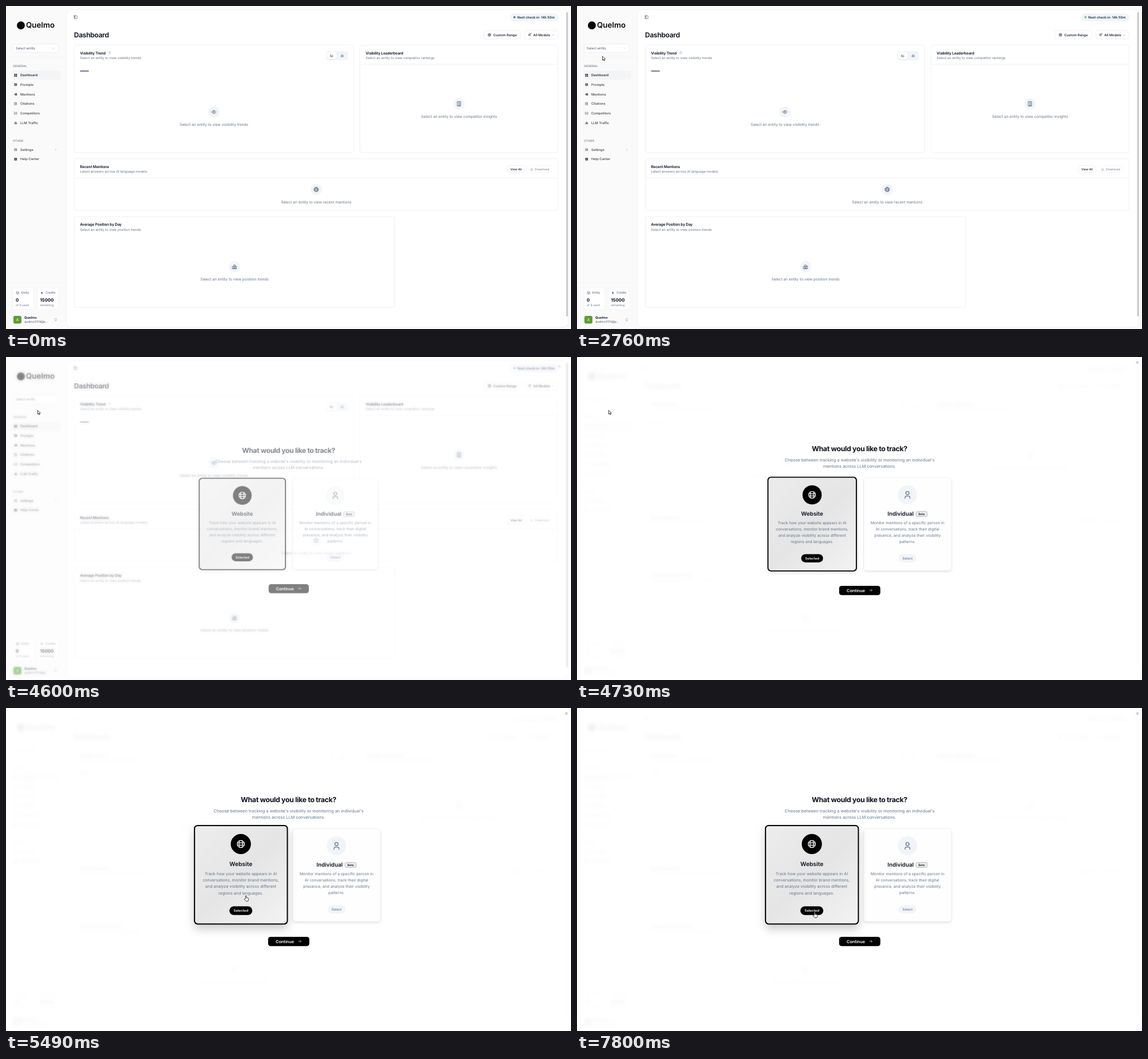
Recreate the animation shown at these times as an HTML page with a canvas. Size 989 px wide and 566 px high, loop 8000 ms.

```html
<!DOCTYPE html>
<html lang="en">
<head>
<meta charset="utf-8">
<title>Dashboard</title>
<style>
html, body { margin: 0; width: 100%; height: 100%; overflow: hidden; background: #fafafa; }
canvas { display: block; width: 989px; height: 566px; }
</style>
</head>
<body>
<canvas id="stage"></canvas>
<script>
const W = 989, H = 566, LOOP = 8000;
const DPR = window.devicePixelRatio || 1;
const INK = '#0a0f1c', SLATE = '#64748b', DARK = '#475569', LINE = '#e6eaef', SOFT = '#f1f5f9';

const ICON = {
  panel: 'M5 3H19Q21 3 21 5V19Q21 21 19 21H5Q3 21 3 19V5Q3 3 5 3ZM9 3V21M6 8V8.1M6 12V12.1',
  down: 'M5 9L12 16L19 9',
  right: 'M9 5L16 12L9 19',
  updown: 'M6 9L12 3L18 9M6 15L12 21L18 15',
  calendar: 'M4 5H20V21H4ZM4 10H20M8 2V6M16 2V6M8 14H9M12 14H13M16 14H17M8 18H9M12 18H13',
  sparkle: 'M10 4L12 10L18 12L12 14L10 20L8 14L2 12L8 10ZM20 2V7M17.5 4.5H22.5M19 18V21',
  info: 'M12 2A10 10 0 1 0 12 22A10 10 0 1 0 12 2ZM12 11V17M12 7V7.5',
  line: 'M3 4V20H21M7 15L11 10L14 13L20 7',
  bars: 'M3 11H9V21H3ZM9 4H15V21H9ZM15 9H21V21H15Z',
  eye: 'M2 12Q6 5 12 5T22 12Q18 19 12 19T2 12ZM12 9A3 3 0 1 0 12 15A3 3 0 1 0 12 9Z',
  building: 'M5 2H19V22H5ZM9 6H9.5M12 6H12.5M15 6H15.5M9 10H9.5M12 10H12.5M15 10H15.5M9 14H9.5M12 14H12.5M15 14H15.5M9 22V18H15V22',
  globe: 'M12 2A10 10 0 1 0 12 22A10 10 0 1 0 12 2ZM12 2A5 10 0 1 0 12 22A5 10 0 1 0 12 2ZM2.5 9H21.5M2.5 15H21.5',
  user: 'M12 2.5A4.6 4.6 0 1 0 12 11.7A4.6 4.6 0 1 0 12 2.5ZM5 22V20Q5 15.5 9.5 15.5H14.5Q19 15.5 19 20V22',
  download: 'M12 3V15M7 10L12 15L17 10M3 16V21H21V16',
  cube: 'M12 2L21 7V17L12 22L3 17V7ZM3 7L12 12L21 7M12 12V22',
  arrow: 'M4 12H20M13 5L20 12L13 19',
  cross: 'M4 4L20 20M20 4L4 20',
  bracket: 'M7 3H3V21H7M17 3H21V21H17M12 8V16M9 12H9.2M15 12H15.2',
  find: 'M20 9V3H3V21H10M7 8H12M15 11A4 4 0 1 0 15 19A4 4 0 1 0 15 11ZM18 18L22 22',
  sliders: 'M5 3V21M12 3V21M19 3V21M2 15H8M9 8H15M16 16H22',
  grid: 'M2 2H10.5V10.5H2ZM13.5 2H22V10.5H13.5ZM2 13.5H10.5V22H2ZM13.5 13.5H22V22H13.5Z',
  chat: 'M5 2H19Q22 2 22 5V16Q22 19 19 19H11L6 23V19H5Q2 19 2 16V5Q2 2 5 2ZM6 7V9H18V7ZM6 12V14H14V12Z',
  voice: 'M2 9H6V16H2ZM7 6H11V19H7ZM12 3H20V21H12ZM21 8H23V16H21Z',
  traffic: 'M2 14H7V21H2ZM9 9H14V21H9ZM16 12H22V21H16ZM3 10L11 3L20 7V9L11 6L4 12Z',
  help: 'M6 2H18Q22 2 22 6V18Q22 22 18 22H6Q2 22 2 18V6Q2 2 6 2ZM11 6V8H13V6ZM11 10V18H13V10Z',
  bolt: 'M14 1L4 14H11L9 23L20 9H13Z'
};
const ARROW = new Path2D('M.5 .5V7.3L2.1 5.9L3.2 8.4L4.4 7.9L3.3 5.5H5.4Z');
const HAND = new Path2D('M2.9 6.3V1.5A.8.8 0 0 1 4.5 1.5V4.4L7 4.9Q8.5 5.2 8.3 6.6L7.9 8.9Q7.7 10 7.1 10.5H3.8L1 7.5C.5 6.7 1.5 6 2.1 6.5Z');

// [time, x, y] of the pointer's centre
const PATH = [
  [760, 985, 594], [1590, 14, 108], [1730, 5, 99.5], [2070, 38, 97], [2340, 38, 97], [2700, 47, 92],
  [3090, 43, 90], [3520, 62.5, 79], [3800, 62.5, 78.5], [4300, 57.5, 97], [4980, 57.5, 97],
  [5420, 421, 333], [5500, 421, 333.5], [5770, 396, 285], [6050, 378, 246], [6540, 424, 361.5],
  [6750, 423.5, 361.5], [6930, 423.5, 361.5], [7150, 426, 370], [7350, 406, 364],
  [7550, 418, 349], [7740, 417, 362.5], [8000, 417, 362.5]
];

let g;

const clamp = v => Math.max(0, Math.min(1, v));
const ramp = (t, a, b) => clamp((t - a) / (b - a));
const easeOut = p => 1 - (1 - p) ** 3;
const mix = (a, b, p) => a + (b - a) * p;

function context(cv) {
  cv.width = W * DPR;
  cv.height = H * DPR;
  const c = cv.getContext('2d');
  c.scale(DPR, DPR);
  return c;
}

function text(s, x, y, size, { w = 400, c = INK, align = 'left', track = 0 } = {}) {
  const k = 8;
  g.save();
  g.translate(x, y + size * .36);
  g.scale(1 / k, 1 / k);
  g.font = `${w} ${size * k}px Inter, sans-serif`;
  g.letterSpacing = `${track * size * k}px`;
  g.textRendering = 'geometricPrecision';
  g.textAlign = align;
  g.fillStyle = c;
  g.fillText(s, 0, 0);
  g.restore();
}

function box(x, y, x2, y2, r, fill, line, lw = .7) {
  g.beginPath();
  g.roundRect(x, y, x2 - x, y2 - y, r);
  if (fill) { g.fillStyle = fill; g.fill(); }
  if (line) { g.strokeStyle = line; g.lineWidth = lw; g.stroke(); }
}

function shadowed(color, blur, dy, draw) {
  g.save();
  g.shadowColor = color;
  g.shadowBlur = blur * DPR;
  g.shadowOffsetY = dy * DPR;
  draw();
  g.restore();
}

function disc(x, y, r, fill) {
  g.beginPath();
  g.arc(x, y, r, 0, 7);
  g.fillStyle = fill;
  g.fill();
}

function icon(name, x, y, size, color, lw = 2, solid = false) {
  const p = new Path2D(ICON[name]);
  g.save();
  g.translate(x - size / 2, y - size / 2);
  g.scale(size / 24, size / 24);
  g.lineCap = g.lineJoin = 'round';
  g.lineWidth = lw;
  g.fillStyle = g.strokeStyle = color;
  if (solid) g.fill(p, 'evenodd'); else g.stroke(p);
  g.restore();
}

function rule(x, x2, y, color = LINE) {
  g.fillStyle = color;
  g.fillRect(x, y - .35, x2 - x, .7);
}

function sidebar() {
  disc(26, 34, 7, '#0a0a0a');
  text('Quelmo', 35, 33.6, 13.4, { w: 600, c: '#0a0a0a' });
  box(12, 66.5, 91.5, 81.5, 4, '#fff', '#e5e7eb');
  text('Select entity', 17, 74, 5.8, { c: DARK });
  icon('down', 83, 74, 5, '#94a3b8');
  rule(0, 106, 89, '#f3f3f4');

  text('GENERAL', 12, 105, 5, { w: 500, c: '#71717a', track: .05 });
  text('OTHER', 12, 235.7, 5, { w: 500, c: '#71717a', track: .05 });
  box(11.5, 113.5, 95.5, 129, 3, '#f3f4f6');
  const rows = [
    ['Dashboard', 'grid', 121.3, true], ['Prompts', 'chat', 138, true], ['Mentions', 'voice', 154.7, true],
    ['Citations', 'find', 171.3], ['Competitors', 'bracket', 188], ['LLM Traffic', 'traffic', 204.7, true],
    ['Settings', 'sliders', 251.7], ['Help Center', 'help', 268.3, true]
  ];
  for (const [label, name, y, solid] of rows) {
    icon(name, 16.8, y, 5.8, y < 125 ? '#18181b' : '#52525b', 2.4, solid);
    text(label, 25, y, 5.82, { w: 500, c: y < 125 ? '#18181b' : '#3f3f46' });
  }
  icon('right', 87, 251.7, 5, SLATE);

  rule(0, 106, 485, '#f3f3f4');
  const stats = [[12, 'Entity', 'cube', '0', 'of 9 used'], [54.5, 'Credits', 'bolt', '15000', 'remaining']];
  for (const [x, label, name, value, note] of stats) {
    box(x, 494, x + 37, 532.5, 4, '#fff', '#eeeff1');
    icon(name, x + 8.3, 502.7, 6, DARK, 2, name === 'bolt');
    text(label, x + 14.8, 502.5, 5.1, { c: DARK });
    text(value, x + 5, 515, 7.8, { w: 700 });
    text(note, x + 5, 524.2, 5.1, { c: SLATE });
  }
  box(13, 543, 27, 556.5, 3, '#5c9e31');
  text('A', 20, 549.8, 6.6, { c: '#fff', align: 'center' });
  text('Quelmo', 32, 546.2, 5.8, { w: 600 });
  text('quelmo3174@p...', 32, 553.2, 5.1, { c: DARK });
  icon('updown', 87, 549.6, 6.2, DARK);
}

function head(x, y, title, note) {
  text(title, x, y, 6.54, { w: 600, track: -.025 });
  text(note, x, y + 9.1, 5.83, { c: SLATE });
}

function empty(name, x, y, note) {
  disc(x, y, 10, SOFT);
  icon(name, x, y, 9.4, DARK, 1.9);
  text(note, x, y + 22, 6.54, { c: SLATE, align: 'center' });
}

function dashboard() {
  g.fillStyle = '#fafafa';
  g.fillRect(0, 0, W, H);
  shadowed('rgba(0,0,0,.09)', 2.5, .3, () => box(106.3, 7, 983.5, 562.5, 8, '#fff'));
  sidebar();
  box(980.8, 11, 983.3, 544, 1.2, '#c2c2c2');

  icon('panel', 121.7, 19.6, 7, DARK, 2.2);
  box(882.5, 13, 967, 26.4, 6.7, SOFT);
  text('Next check in: 14h 50m', 895, 19.7, 5.8, { w: 600, c: '#1e293b' });
  text('Dashboard', 119, 50.8, 12.1, { w: 600, track: -.025 });
  box(836.3, 43, 901, 58, 4, '#fff', LINE);
  icon('calendar', 846.3, 50.6, 6, INK);
  text('Custom Range', 853, 50.6, 5.9, { w: 500 });
  box(908, 43, 966, 58, 4, '#fff', LINE);
  icon('sparkle', 916.5, 50.6, 6, INK);
  text('All Models', 923, 50.6, 5.9, { w: 500 });
  icon('down', 957.5, 50.6, 5, SLATE);

  for (const [x, y, x2, y2] of [[119.5, 68.5, 608.5, 257], [619.5, 68.5, 966, 257], [119.5, 267.5, 966, 358.5], [119.5, 369, 680.5, 528]])
    box(x, y, x2, y2, 4, '#fff', LINE);
  rule(619.5, 966, 102);
  rule(119.5, 966, 301.3);

  head(129.5, 82.2, 'Visibility Trend', 'Select an entity to view visibility trends');
  icon('info', 181.5, 82, 5, '#8a97a9');
  box(560.5, 79.3, 598.5, 95, 4, SOFT);
  shadowed('rgba(0,0,0,.1)', 1.5, .4, () => box(562, 81, 578.5, 93.3, 3, '#fff'));
  icon('line', 570.4, 87, 5.8, INK, 2.4);
  icon('bars', 588.6, 87, 5.6, SLATE);
  box(129.5, 113, 145, 115, .8, '#6f7c96');
  head(629.5, 82.2, 'Visibility Leaderboard', 'Select an entity to view competitor rankings');
  head(129.5, 281.2, 'Recent Mentions', 'Latest answers across AI language models');
  head(129.5, 382.7, 'Average Position by Day', 'Select an entity to view position trends');

  box(877.5, 279.5, 908, 292.5, 4, '#fff', LINE);
  text('View All', 892.8, 286, 5.15, { w: 500, align: 'center' });
  box(911.5, 279.5, 956, 292.5, 4, '#fff', '#f3f5f8');
  icon('download', 920, 286, 5.8, '#858b96');
  text('Download', 926, 286, 5.15, { w: 500, c: '#858b96' });

  empty('eye', 364, 185.7, 'Select an entity to view visibility trends');
  empty('building', 793, 171.4, 'Select an entity to view competitor insights');
  empty('globe', 543, 321.5, 'Select an entity to view recent mentions');
  empty('bars', 400, 457, 'Select an entity to view position trends');
}

function lines(rows, x, y, step, size) {
  rows.forEach((s, i) => text(s, x, y + i * step, size, { c: SLATE, align: 'center' }));
}

function zoom(k, x, y) {
  g.translate(x, y);
  g.scale(k, k);
  g.translate(-x, -y);
}

function websiteCard(hover) {
  g.save();
  zoom(mix(1, 1.05, hover), 420, 304);
  shadowed(`rgba(0,0,0,${mix(.14, .2, hover)})`, mix(6, 16, hover), mix(2, 8, hover), () => box(333.3, 209.7, 490, 375.8, 6, '#000'));
  box(335.2, 211.6, 488.1, 373.9, 4.5, '#fff');
  const fill = g.createLinearGradient(335, 214, 488, 372);
  fill.addColorStop(0, 'rgba(0,0,0,.075)');
  fill.addColorStop(.5, 'rgba(0,0,0,.1)');
  fill.addColorStop(1, 'rgba(0,0,0,.05)');
  box(335.2, 211.6, 488.1, 373.9, 4.5, fill);
  disc(411.5, 241.5, 16.8, '#000');
  icon('globe', 411.5, 241.5, 14.4, '#fff');
  text('Website', 411.5, 274.8, 9.75, { w: 600, align: 'center' });
  lines(['Track how your website appears in AI', 'conversations, monitor brand mentions,',
    'and analyze visibility across different', 'regions and languages.'], 411.4, 290.7, 10.9, 6.78);
  box(392.4, 345.4, 430.6, 360, 7.3, '#000');
  text('Selected', 411.5, 352.7, 5.8, { w: 600, c: '#fff', align: 'center' });
  g.restore();
}

function individualCard() {
  shadowed('rgba(0,0,0,.13)', 5, 2, () => box(502, 211.4, 655.3, 374, 4.5, '#fefefe'));
  box(502, 211.4, 655.3, 374, 4.5, '#fefefe', '#eceff3');
  disc(578.5, 241.5, 16.8, SOFT);
  icon('user', 578.5, 241.5, 14.8, SLATE);
  text('Individual', 543.5, 274.8, 9.75, { w: 600 });
  box(593.5, 270.7, 613, 279.4, 2.5, '#ececec', '#a3a3a3', .7);
  text('Beta', 603.2, 275.1, 4.95, { w: 600, align: 'center' });
  lines(['Monitor mentions of a specific person in', 'AI conversations, track their digital',
    'presence, and analyze their visibility', 'patterns.'], 578.5, 290.7, 10.9, 6.78);
  box(563, 345.4, 594, 360, 7.3, SOFT);
  text('Select', 578.5, 352.7, 5.9, { w: 500, c: SLATE, align: 'center' });
}

function dialog(hover) {
  text('What would you like to track?', 494.6, 160.2, 12.3, { w: 700, track: -.025, align: 'center' });
  lines(["Choose between tracking a website's visibility or monitoring an individual's",
    'mentions across LLM conversations.'], 494.7, 180.3, 11.4, 7.4);
  individualCard();
  websiteCard(hover);
  box(458.8, 401, 531, 417.2, 4.5, '#000');
  text('Continue', 472, 408.9, 7.33, { w: 600, c: '#fff' });
  icon('arrow', 514.3, 408.8, 6.6, '#fff');
  icon('cross', 981, 9.5, 5.4, '#404040', 2.4);
}

function dot(t) {
  const p = .5 - .5 * Math.cos((t - 250) / 1000 * Math.PI);
  disc(890, 19.7, 1.9, `rgb(${mix(80, 159, p)},${mix(107, 242, p)},${mix(112, 214, p)})`);
}

function pointerAt(t) {
  const i = PATH.findIndex(k => k[0] > t);
  if (i < 1) return null;
  const [a, ax, ay] = PATH[i - 1], [b, bx, by] = PATH[i];
  let p = ramp(t, a, b);
  p = p * p * (3 - 2 * p);
  return [mix(ax, bx, p), mix(ay, by, p)];
}

function pointer(t) {
  const at = pointerAt(t);
  if (!at) return;
  const [x, y] = at;
  const hand = t > 4560 ? x > 333 : x < 92 && y < 86;
  const shape = hand ? HAND : ARROW;
  g.save();
  g.translate(x - (hand ? 4.6 : 2.6), y - (hand ? 5.5 : 4.2));
  g.lineJoin = 'round';
  g.lineWidth = .85;
  g.strokeStyle = '#222';
  g.fillStyle = '#fff';
  g.fill(shape);
  g.stroke(shape);
  g.restore();
}

const [base, haze, sheet] = [1, 2, 3].map(() => document.createElement('canvas'));
g = context(base);
dashboard();
g = context(haze);
g.drawImage(base, 0, 0, W, H);
g.filter = `blur(${2.6 * DPR}px)`;
g.drawImage(base, 0, 0, W, H);

// the dialog fades as one layer
g = context(sheet);
dialog(0);

g = context(document.getElementById('stage'));

function frame(now) {
  const t = now % LOOP;
  g.drawImage(base, 0, 0, W, H);
  dot(t);
  const open = easeOut(ramp(t, 4560, 4760));
  if (open > 0) {
    g.save();
    g.globalAlpha = open;
    g.drawImage(haze, 0, 0, W, H);
    g.globalAlpha = open * .95;
    g.fillStyle = '#fff';
    g.fillRect(0, 0, W, H);
    g.globalAlpha = open;
    zoom(mix(.95, 1, open), W / 2, H / 2);
    if (open < 1) g.drawImage(sheet, 0, 0, W, H);
    else dialog(easeOut(ramp(t, 5230, 5480)));
    g.restore();
  }
  pointer(t);
}

const start = performance.now();
(function tick() {
  frame(performance.now() - start);
  requestAnimationFrame(tick);
})();
</script>
</body>
</html>
```
